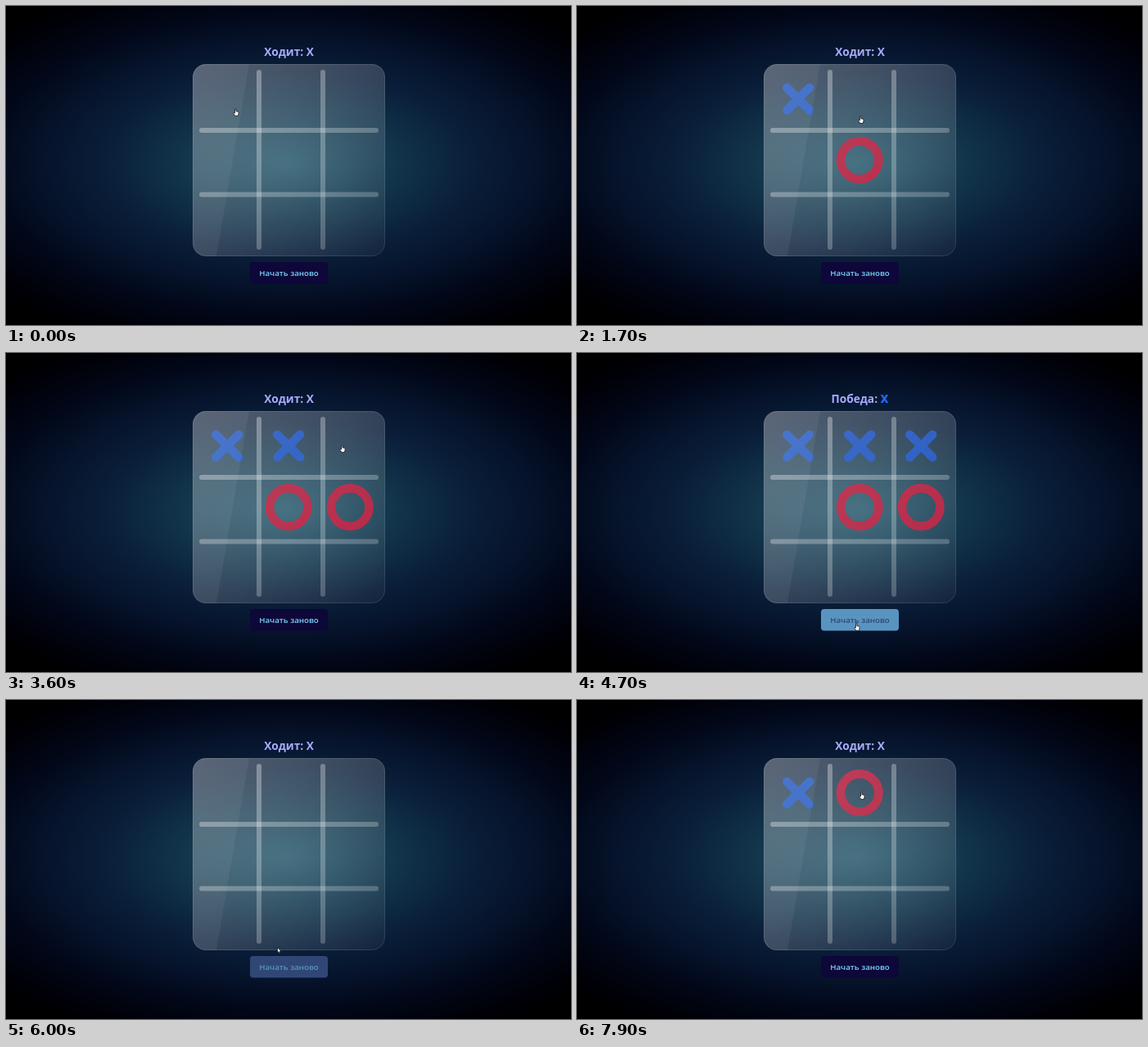
These frames come from a looping animation (690x390 px, 8000 ms). An HTML page:

```html
<!DOCTYPE html>
<html lang="ru">
<head>
<meta charset="utf-8">
<title>Крестики-нолики</title>
<style>
  html, body { margin: 0; width: 100%; height: 100%; overflow: hidden; background: #000; }
  svg { display: block; width: 690px; height: 390px; }
  text { font-family: "Open Sans", "Noto Sans", sans-serif; text-anchor: middle; }
  #label { font-size: 13.7px; font-weight: 700; fill: #a8abff; }
  #winner { font-weight: 800; fill: #2563ff; }
  #caption { font-size: 9.7px; font-weight: 600; }
  #marks { fill: none; stroke-width: 10.6; stroke-linecap: round; opacity: .93; }
  #bars { fill: none; stroke: url(#bar); stroke-width: 6; stroke-linecap: round; }
</style>
</head>
<body>
<svg viewBox="0 0 690 390">
  <defs>
    <radialGradient id="night" gradientUnits="userSpaceOnUse" cx="0" cy="0" r="1"
        gradientTransform="translate(345 193) scale(488 244)">
      <stop offset="0" stop-color="#205468"/>
      <stop offset=".3" stop-color="#103148"/>
      <stop offset=".45" stop-color="#0a1f3a"/>
      <stop offset=".6" stop-color="#06142c"/>
      <stop offset=".75" stop-color="#02081a"/>
      <stop offset=".92" stop-color="#000006"/>
      <stop offset="1" stop-color="#000"/>
    </radialGradient>
    <linearGradient id="glass" x1="0" y1="0" x2="1" y2="1">
      <stop offset="0" stop-color="#fff" stop-opacity=".165"/>
      <stop offset="1" stop-color="#fff" stop-opacity=".02"/>
    </linearGradient>
    <linearGradient id="bar" gradientUnits="userSpaceOnUse" x1="236" y1="78" x2="455" y2="298">
      <stop offset="0" stop-color="#fff" stop-opacity=".36"/>
      <stop offset="1" stop-color="#fff" stop-opacity=".2"/>
    </linearGradient>
    <clipPath id="boardClip"><rect x="228" y="71" width="235" height="235" rx="16"/></clipPath>
  </defs>

  <rect width="690" height="390" fill="url(#night)"/>
  <text id="label" x="345.5" y="61.4"><tspan id="status"></tspan><tspan id="winner"></tspan></text>

  <g clip-path="url(#boardClip)">
    <rect x="228" y="71" width="235" height="235" fill="url(#glass)"/>
    <g id="marks"></g>
    <rect x="228" y="71" width="235" height="235" fill="url(#glass)"/>
    <path d="M228 71H297L257 306H228Z" fill="#fff" fill-opacity=".05"/>
  </g>
  <rect x="228.5" y="71.5" width="234" height="234" rx="15.5" fill="none" stroke="#fff" stroke-opacity=".11"/>
  <g id="bars">
    <path d="M309 81V295"/><path d="M387 81V295"/>
    <path d="M239 152H452"/><path d="M239 230.5H452"/>
  </g>

  <rect id="button" x="298" y="313" width="95" height="26.5" rx="4"/>
  <text id="caption" x="345.5" y="330.2">Начать заново</text>

  <g id="cursor" fill="#fff" stroke="#10151c" stroke-width=".8" stroke-linejoin="round">
    <path id="hand" d="M-1.5 -4.4Q-.8 -5 -.1 -4.4V-1.4L2.3 -.8Q3.3 -.4 3.2 .7L2.5 4.3H-1.2L-3.2 1.2Q-3.2 .2 -2.2 .4L-1.5 1.1Z"/>
    <path id="arrow" d="M-1 -3.5V3L.5 1.7L1.5 4L2.6 3.5L1.6 1.3L3.5 1.1Z"/>
  </g>
</svg>
<script>
const LOOP = 8000, STEP = 100;
const BLUE = "rgb(30,86,200)", RED = "rgb(190,30,62)";
const DARK = [14, 7, 57], LIGHT = [122, 212, 252];
const $ = id => document.getElementById(id);

// Pointer stops; the place of each click tells what it hits
const stops = [
  { go: 0, arrive: 0, click: 500, x: 281, y: 130 },
  { go: 550, arrive: 950, click: 1300, x: 349, y: 188 },
  { go: 1350, arrive: 1900, click: 2000, x: 346, y: 118 },
  { go: 2050, arrive: 2600, click: 2800, x: 431, y: 198 },
  { go: 2850, arrive: 3600, click: 3800, x: 411, y: 117 },
  { go: 3950, arrive: 4700, click: 5400, x: 342, y: 335 },
  { go: 5650, arrive: 7100, click: 7300, x: 277, y: 137 },
  { go: 7350, arrive: 7800, click: 7800, x: 348, y: 117 }
];

const clamp = v => Math.min(1, Math.max(0, v));
const smooth = k => k * k * (3 - 2 * k);
const easeOut = k => 1 - (1 - k) ** 2;
const mix = (a, b, k) => a + (b - a) * k;
const mixColor = (a, b, k) => `rgb(${a.map((v, i) => Math.round(mix(v, b[i], k)))})`;
const show = (el, on) => el.setAttribute("visibility", on ? "visible" : "hidden");

function pointerAt(t) {
  let { x, y } = stops[0];
  for (const s of stops.slice(1)) {
    const k = smooth(clamp((t - s.go) / (s.arrive - s.go)));
    x = mix(x, s.x, k);
    y = mix(y, s.y, k);
  }
  return [x, y];
}

function cellAt({ x, y }) {
  return Math.floor((y - 71) / 78) * 3 + Math.floor((x - 228) / 78);
}

// Cells in order of play; a click below the board clears it
function movesAt(t) {
  let moves = [];
  for (const s of stops.filter(s => s.click <= t)) {
    const cell = cellAt(s);
    if (cell > 8) moves = []; else moves.push(cell);
  }
  return moves;
}

function hasRow(cells) {
  const full = line => line.every(c => cells.includes(c));
  return [0, 1, 2].some(i =>
    full([i * 3, i * 3 + 1, i * 3 + 2]) || full([i, i + 3, i + 6])) ||
    full([0, 4, 8]) || full([2, 4, 6]);
}

function markPath(cell, isX) {
  const x = 270.2 + cell % 3 * 75, y = 113.6 + Math.floor(cell / 3) * 75;
  const d = isX
    ? `M${x - 13.9} ${y - 13.9}l27.8 27.8m0 -27.8l-27.8 27.8`
    : `M${x - 23.2} ${y}a23.2 23.2 0 1 1 46.4 0a23.2 23.2 0 1 1 -46.4 0Z`;
  return `<path d="${d}" stroke="${isX ? BLUE : RED}"/>`;
}

function draw(t) {
  const moves = movesAt(t);
  const won = hasRow(moves.filter((_, i) => i % 2 === 0));
  $("marks").innerHTML = moves.map((cell, i) => markPath(cell, i % 2 === 0)).join("");
  $("status").textContent = won ? "Победа:\u00a0" : "Ходит: " + (moves.length % 2 ? "O" : "X");
  $("winner").textContent = won ? "X" : "";

  const fade = from => easeOut(clamp((t - from) / 500));
  const hover = fade(4480) - fade(5780);
  $("button").setAttribute("fill", mixColor(DARK, LIGHT, hover));
  $("caption").setAttribute("fill", mixColor(LIGHT, DARK, hover));

  const [x, y] = pointerAt(t);
  const onTarget = y < 301 || y > 313;
  $("cursor").setAttribute("transform", `translate(${x} ${y})`);
  show($("hand"), onTarget);
  show($("arrow"), !onTarget);
}

const start = performance.now();
function tick() {
  const t = (performance.now() - start) % LOOP;
  draw(Math.floor(t / STEP) * STEP);
  requestAnimationFrame(tick);
}
tick();
</script>
</body>
</html>
```
